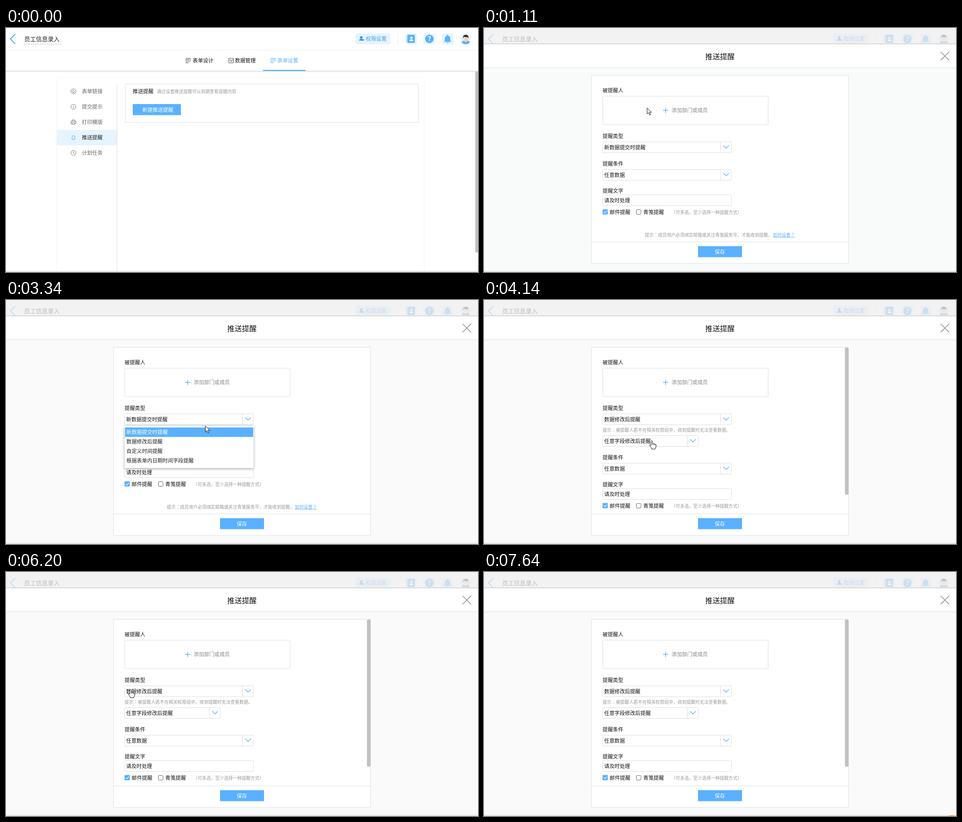
Write an HTML page that moves like this. It is 1039 by 539 pixels and loops after 7.8 s.

```html
<!DOCTYPE html>
<html lang="zh-CN">
<head>
<meta charset="utf-8">
<title>推送提醒</title>
<style>
  html, body { margin: 0; width: 100%; height: 100%; overflow: hidden; background: #fff; }
  svg { display: block; width: 100vw; height: 100vh; }
  text { font-family: "Noto Sans CJK SC", "Noto Sans CJK", "Noto Sans", sans-serif; white-space: pre; }
  .mid { font-family: "Noto Sans CJK JP", "Noto Sans CJK", sans-serif; }
</style>
</head>
<body>
<svg id="stage" viewBox="0 0 1039 539"></svg>
<script>
const LOOP = 7800, BLUE = '#5ab1ff', PALE = '#e6f4ff', EDGE = '#dedede';

// Markup helpers; text is placed by its left edge and vertical centre, some punctuation is centred in its cell.
const text = (x, cy, s, fill = '#141414', size = 11.4, more = '') =>
  `<text x="${x}" y="${cy + size * 0.38}" font-size="${size}" fill="${fill}" ${more}>${
    s.replace(/[：？]/g, '<tspan class="mid" lang="ja">$&</tspan>')}</text>`;
const box = (x, y, w, h, fill, rx = 0, more = '') =>
  `<rect x="${x}" y="${y}" width="${w}" height="${h}" rx="${rx}" fill="${fill}" ${more}/>`;
const frame = (x, y, w, h, stroke = EDGE, fill = '#fff') =>
  box(x + 0.5, y + 0.5, w - 1, h - 1, fill, 1, `stroke="${stroke}"`);
const line = (d, stroke, width = 1, more = '') =>
  `<path d="${d}" fill="none" stroke="${stroke}" stroke-width="${width}" ${more}/>`;
const shape = (d, fill, more = '') => `<path d="${d}" fill="${fill}" ${more}/>`;
const dot = (x, y, r, fill, more = '') => `<circle cx="${x}" cy="${y}" r="${r}" fill="${fill}" ${more}/>`;
const group = (id, body, more = '') => `<g id="${id}" ${more}>${body}</g>`;
const at = (x, y, body) => `<g transform="translate(${x} ${y})">${body}</g>`;

const select = (y, w, label) =>
  frame(261, y, w, 25) + line(`M${261 + w - 24.5} ${y}v25`, EDGE) +
  line(`M${261 + w - 18} ${y + 8.5}l6 6 6-6`, BLUE, 1.4) + text(264.5, y + 12.5, label);

const header = () =>
  box(0, 0, 1039, 48, '#fff') + line('M0 48.5H1039', '#eee') +
  line('M20.5 13.5L9.5 24l11 11', BLUE, 2.2) +
  text(40, 24, '员工信息录入', '#222', 13) +
  line('M39 35.5H123', '#aaa', 1, 'stroke-dasharray="3 2"') +
  box(769, 12, 77, 24, PALE, 3) +
  at(777, 18, dot(5, 3, 3, '#3f97ea') + shape('M0 10q0-4 5-4t5 4z', '#3f97ea') + dot(10, 8.5, 1.4, '#3f97ea')) +
  text(792, 24, '权限设置', '#459cec') +
  line('M862.5 12v24', '#d8ebfb') +
  [879, 919.5, 960].map(x => box(x, 12, 25, 24, PALE, 3)).join('') +
  at(882, 15, box(2, 0, 16, 18, BLUE, 1) + line('M0 4h4M0 9h4M0 14h4', BLUE, 2) +
    dot(10.5, 6.5, 2.5, '#fff') + shape('M6 14q0-4 4.5-4t4.5 4z', '#fff')) +
  dot(932, 24, 9.3, BLUE) +
  text(928.4, 24, '?', '#fff', 14, 'font-weight="700"') +
  at(972, 15, shape('M-6 13V8a6 6 0 0 1 12 0v5l2.5 2.5h-17z', BLUE) + dot(0, 1.5, 1.6, BLUE) + shape('M-3 16.5h6q-3 3-6 0z', BLUE)) +
  dot(1012, 24, 12, PALE) +
  shape('M1003 32q1-4 6-4h6q5 0 6 4a12 12 0 0 1-18 0z', BLUE) +
  shape('M1007 20h10v5q-1 5-5 6-4-1-5-6z', '#fbd0ae') +
  shape('M1006 23q-1-7 5-8 8-1 7 8l-2-3q-5 1-8-1z', '#2d2d33');

const page = () => {
  const items = ['表单链接', '提交提示', '打印模版', '推送提醒', '计划任务'];
  const glyphs = [
    dot(0, 0, 5.5, 'none', 'stroke="#777"') + line('M-3-1l2-2 4 4-2 2-4-4M-3 1l4 3', '#777', 0.9),
    dot(0, 0, 5.5, 'none', 'stroke="#777"') + line('M0-1v4M0-3.3v1.3', '#777', 1.2),
    line('M-3-1v-4h6v4M-3 3h-2.5v-5h11v5h-2.5M-3 1h6v4h-6z', '#777'),
    line('M-4 3q1-1 1-4a3 3 0 0 1 6 0q0 3 1 4zM-1.5 5h3M0-5.5v1.5', BLUE),
    dot(0, 0, 5.5, 'none', 'stroke="#777"') + line('M0-3.5V0l2.5 2', '#777')
  ];
  const doc = c => line('M6 10.5H.5V.5h9V5M2.5 3h5M2.5 5.5h4M2.5 8h2M6 8.5l4-3', c);
  return box(0, 0, 1039, 539, '#fff') + header() +
    at(396, 66.5, doc('#444')) + text(411, 72, '表单设计') +
    at(490, 66.5, line('M.5.5h10v10H.5zM2 6l2-2.5L6 8l3-5', '#444')) + text(504, 72, '数据管理') +
    at(583, 66.5, doc(BLUE)) + text(597.5, 72, '表单设置', BLUE) +
    box(0, 94.5, 1039, 1.5, '#dcdcdc') + box(0, 96, 1039, 2, '#f5f5f5') + box(566, 92.5, 93.5, 2.5, BLUE) +
    frame(111, 109, 810, 440, '#f1f1f1') +
    box(112, 225, 132, 34, PALE, 3) + line('M244.5 123V537', EDGE) +
    items.map((s, i) => at(148.5, 140 + i * 34, glyphs[i]) +
      text(167, 140 + i * 34, s, i === 3 ? '#222' : '#666')).join('') +
    frame(262, 123, 646, 86) + text(279, 140, '推送提醒') +
    text(332, 140.5, '通过设置推送提醒可以到期查看提醒内容', '#999', 9.73) +
    box(279, 168, 106, 24.5, BLUE, 1) + text(300, 180.5, '新建推送提醒', '#fff') +
    box(1033, 96, 6, 441, '#fafafa') + box(1033, 96, 6, 400, '#c1c1c1', 2);
};

const dialog = () => {
  const lower = text(261, 299.5, '提醒条件') + select(312, 284, '任意数据') +
    text(261, 360, '提醒文字') + frame(261, 368, 284, 25) + text(264.5, 381, '请及时处理') +
    box(261, 400.5, 11.5, 11.5, BLUE, 1) + line('M263.5 406.3l2.6 2.6 4.4-4.8', '#fff', 1.2) +
    text(276.5, 406.5, '邮件提醒') + frame(335, 401, 11, 11, '#666') +
    text(350.5, 406.5, '青笺提醒') + text(412, 407, '（可多选，至少选择一种提醒方式）', '#999', 9.73) +
    text(354, 457, '提示：成员用户必须绑定邮箱或关注青笺服务号，才能收到提醒。', '#999', 9.7) +
    text(636, 457, '如何设置？', BLUE, 9.7, 'text-decoration="underline"');
  const extra = text(261, 287.5, '提示：被提醒人若不在相关权限组中，收到提醒时无法查看数据。', '#999', 9.73) +
    select(299, 211, '任意字段修改后提醒') + box(794.5, 105, 8, 325, '#c1c1c1', 3);
  const options = ['新数据提交时提醒', '数据修改后提醒', '自定义时间提醒', '根据表单内日期时间字段提醒'];
  return box(0, 34, 1039, 2, '#d9d9d9') + box(0, 36, 1039, 505, '#fafafa', 0, 'id="back"') +
    box(0, 36, 1039, 51, '#fff') + line('M0 87.5H1039', '#e0e0e0') +
    text(487, 63, '推送提醒', '#141414', 16.2) +
    line('M1005 52.5l19 19M1024 52.5l-19 19', '#999', 1.7) +
    frame(236, 104, 567, 417) +
    text(261, 138, '被提醒人') + frame(261, 150, 365, 64) +
    line('M394 182h11.5M399.75 176.2v11.6', BLUE, 1.4) + text(413, 182, '添加部门或成员', '#888') +
    text(261, 239, '提醒类型') +
    group('typeNew', select(251, 284, options[0])) + group('typeEdit', select(251, 284, options[1])) +
    `<g clip-path="url(#body)">${group('lower', lower)}</g>` + group('extra', extra) +
    line('M237 472.5H802', '#e0e0e0') +
    box(471, 482, 97, 24.3, BLUE, 1) + text(507.8, 494.5, '保存', '#fff', 11.5, 'font-weight="500"') +
    group('menu',
      box(261, 277, 284, 94, '#fff', 0, 'style="filter:drop-shadow(0 2px 3px #0005)"') +
      line('M261 277.5h284', '#ddd') + box(262, 281.5, 282, 21, BLUE, 0, 'id="mark"') +
      options.map((s, i) => text(265, 292 + i * 21, s, '#222', 11.4, 'class="option"')).join(''));
};

const pointer = 'stroke="#111" stroke-linejoin="round"';
stage.innerHTML =
  `<defs><clipPath id="body"><path d="M237 277H802V472H237z"/></clipPath>
   <clipPath id="view"><path d="M0 0H1039V537H0z"/></clipPath></defs>` +
  `<g clip-path="url(#view)">${page()}${box(0, 0, 1039, 539, '#eee', 0, 'id="veil"')}${group('dialog', dialog())}</g>` +
  box(0, 537, 1039, 1, '#ccc') +
  group('cursor',
    group('arrow', shape('M0 0v13.5l3.2-3 2.5 5.4 2.2-1-2.4-5.2h4.2z', '#fff', pointer)) +
    group('hand', shape('M-1.5 11V1.5q1.5-2 3 0V7q2-1.2 3 .6 2-.8 2.8.8 2-.3 2 1.6v4l-2 3.5v1.5H-.5v-2l-4.5-6q0-2.2 2-1.2z', '#fff', pointer) +
      line('M1.5 7v3M4.5 8v2.5M7.2 9v2', '#111', 0.9), 'transform="translate(-0.5 -0.8)"')) +
  '<ellipse id="spot" cx="1030" cy="542.5" rx="9" ry="5.5" fill="#f3a45c"/>';

// Pointer path: time, x, y, look from that time on.
const path = [
  [150, 1030, 540, 'arrow'], [550, 340, 182, 'hand'], [700, 340, 182, 'arrow'],
  [950, 340, 182, 'arrow'], [1100, 359, 176.5, 'arrow'], [1180, 359, 176.5, 'hand'],
  [1580, 359, 176.5, 'hand'], [1960, 441.5, 268.5, 'hand'], [2700, 441.5, 268.5, 'hand'],
  [2900, 439, 278, 'arrow'], [3400, 439, 278, 'hand'], [3740, 370, 311, 'hand'],
  [4290, 370, 311, 'hand'], [4840, 340, 303, 'hand'], [5000, 340, 303, 'hand'],
  [5160, 332, 300, 'hand'], [5320, 332, 300, 'hand'], [6040, 274.5, 259.5, 'hand'],
  [6680, 274.5, 259.5, 'arrow'], [7320, 1030, 541, 'none']
];
const el = id => document.getElementById(id);
const show = (id, on) => { el(id).style.display = on ? '' : 'none'; };
const ramp = (t, a, b) => {
  const p = Math.min(1, Math.max(0, (t - a) / (b - a)));
  return p * p * (3 - 2 * p);
};
const choices = document.querySelectorAll('.option');

function render(t) {
  const open = ramp(t, 700, 1000), edited = t >= 3900;
  el('veil').style.opacity = 0.76 * open;
  show('dialog', open > 0);
  el('dialog').setAttribute('transform', `translate(0 ${505 * (1 - open)})`);
  el('back').setAttribute('fill', t < 2300 ? '#f9fbfb' : '#fafafa');
  show('typeNew', !edited);
  show('typeEdit', edited);
  show('extra', edited);
  el('lower').setAttribute('transform', `translate(0 ${edited ? 48 : 0})`);

  const i = path.findLastIndex(k => k[0] <= t);
  const a = path[Math.max(i, 0)], b = path[i + 1] || a;
  const p = a === b ? 0 : ramp(t, a[0], b[0]);
  const x = a[1] + (b[1] - a[1]) * p, y = a[2] + (b[2] - a[2]) * p;
  const look = i < 0 ? 'none' : a[3];
  el('cursor').setAttribute('transform', `translate(${x} ${y})`);
  show('arrow', look === 'arrow');
  show('hand', look === 'hand');

  const picked = y > 302 ? 1 : 0;
  show('menu', t >= 2300 && !edited);
  el('mark').setAttribute('y', 281.5 + picked * 21);
  choices.forEach((c, n) => c.setAttribute('fill', n === picked ? '#fff' : '#222'));
  show('spot', t >= 7640);
}

const start = performance.now();
function tick() {
  render((performance.now() - start) % LOOP);
  requestAnimationFrame(tick);
}
tick();
</script>
</body>
</html>
```
